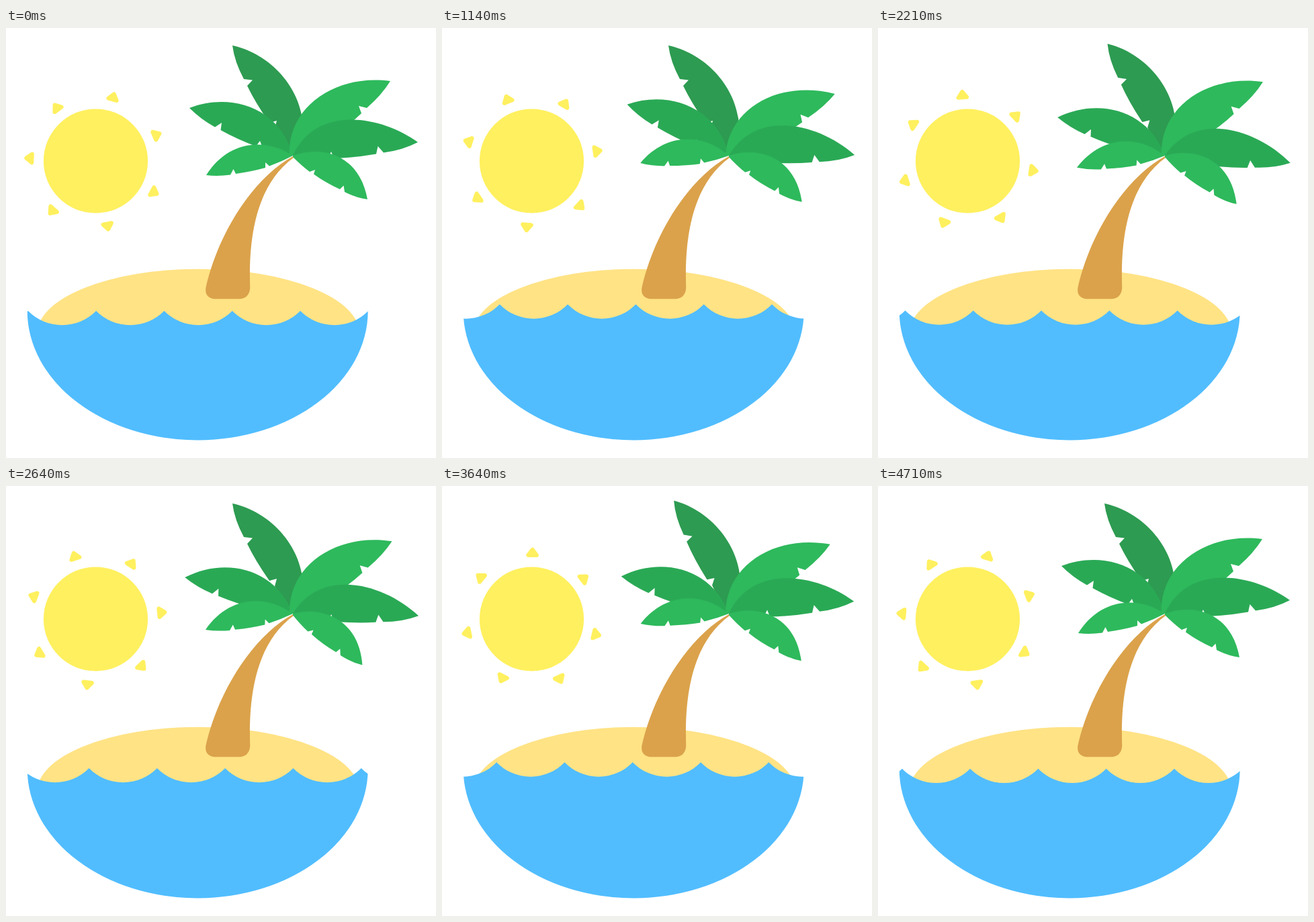
An HTML page for the animation above (4.78 s loop, 640 by 640 pixels).

```html
<!DOCTYPE html>
<html lang="en">
<head>
<meta charset="utf-8">
<title>Island</title>
<style>
  html, body { margin: 0; height: 100%; overflow: hidden; background: #fff; }
  svg { display: block; width: 100%; height: 100%; }
</style>
</head>
<body>
<svg viewBox="0 0 640 640">
  <clipPath id="bowl"><ellipse cx="285.2" cy="421" rx="253.5" ry="192.5"/></clipPath>
  <g fill="#fff05f">
    <circle cx="133.5" cy="198" r="77.6"/>
    <g id="rays" stroke="#fff05f" stroke-width="6" stroke-linejoin="round"></g>
  </g>
  <ellipse cx="286.3" cy="455" rx="240" ry="96.3" fill="#ffe385"/>
  <path fill="#dba24b" d="M427 191C372 221 318 298 297.5 386Q295 401 310 403.3H348Q362 402 363.3 387C361 320 369 236 428 193Z"/>
  <g id="leaves"></g>
  <g clip-path="url(#bowl)"><path id="water" fill="#51bdff"/></g>
</svg>
<script>
const LOOP = 4780, WAVE = 101.3, RAYS = 7;
const $ = id => document.getElementById(id);

function add(parent, d, fill) {
  const path = document.createElementNS('http://www.w3.org/2000/svg', 'path');
  path.setAttribute('d', d);
  if (fill) path.setAttribute('fill', fill);
  return parent.appendChild(path);
}

for (let i = 0; i < RAYS; i++)
  add($('rays'), 'M95-6.3V6.3L103.3 0Z').setAttribute('transform', `rotate(${i * 360 / RAYS})`);

const DARK = '#2d9b51', MID = '#2aa955', LIGHT = '#2eb95c';

// Each leaf: colour, outline, sway as [ms, degrees] stops.
const leaves = [
  [DARK, 'M337 26C385 36 432 78 441 134Q445 160 427 190L422 182Q408 165 400 149L403 138L392 141Q371 111 359 86L367 77.5L354 76Q340 50 337 26Z',
    [[0, 0], [300, 1.5], [600, 0], [1140, 0], [1950, 2.3], [2640, 0], [3350, 3.4], [4400, 0], [LOOP, 0]]],
  [MID, 'M273 119C335 95 408 119 427 190Q400 186 381 176L378 168L372 176Q345 166 319.5 152L321 141L311 147.5Q290 136 273 119Z',
    [[0, 0], [1100, 2], [2550, -6.2], [3400, -6.2], [4700, 0], [LOOP, 0]]],
  [LIGHT, 'M572 79C487 68 419 120 422 188L427 190Q490 165 529 127L525 116L537 119Q559 100 572 79Z',
    [[0, 0], [1150, 7.2], [2300, .4], [3300, 3.9], [4400, 0], [LOOP, 0]]],
  [MID, 'M613 170C555 128 460 116 427 190L480 192L484 184L488 194Q520 193 551 187.5L553.5 176L562 185.5Q590 182 613 170Z',
    [[0, 0], [200, 0], [1900, 10], [3950, 0], [LOOP, 0]]],
  [LIGHT, 'M298 219C330 168 385 162 427 190Q410 199 392 205.5L386 200V208Q366 213.5 342 217L338.5 210L334 218.5Q315 221 298 219Z',
    [[0, 0], [1100, 7.9], [1800, 7.9], [2600, 2.2], [3850, 6.5], [4700, 0], [LOOP, 0]]],
  [LIGHT, 'M427 190C470 174 526 188 538 255Q522 253 504 244L502.5 234.5L497 240Q475 230 458 217.5L460 211L452 214Q440 205 427 192Z',
    [[0, 0], [1140, 2], [1700, 1.3], [2750, 6.3], [4400, 0], [LOOP, 0]]],
].map(([fill, d, stops]) => ({ path: add($('leaves'), d, fill), stops }));

function sway(stops, t) {
  const i = stops.findIndex(([time]) => time > t);
  const [t0, a] = stops[i - 1], [t1, b] = stops[i];
  return a + (b - a) * (1 - Math.cos(Math.PI * (t - t0) / (t1 - t0))) / 2;
}

function draw(now) {
  const t = now % LOOP, p = t / LOOP;
  const angle = 28.2 - p * 3 * 360 / RAYS;
  $('rays').setAttribute('transform', `translate(133.5 198) rotate(${angle})`);

  for (const { path, stops } of leaves)
    path.setAttribute('transform', `rotate(${sway(stops, t)} 427 190)`);

  // The water travels two crests and bobs twice per loop.
  const x = 32.9 - (2 * p % 1) * WAVE;
  const y = 416.1 + 4.8 * Math.cos(4 * Math.PI * p);
  const arc = `a70.9 70.9 0 0 0 ${WAVE} 0`;
  $('water').setAttribute('d', `M${x - WAVE} ${y}${arc.repeat(8)}V640H${x - WAVE}Z`);
}

const start = performance.now();
function tick() {
  draw(performance.now() - start);
  requestAnimationFrame(tick);
}
tick();
</script>
</body>
</html>
```
